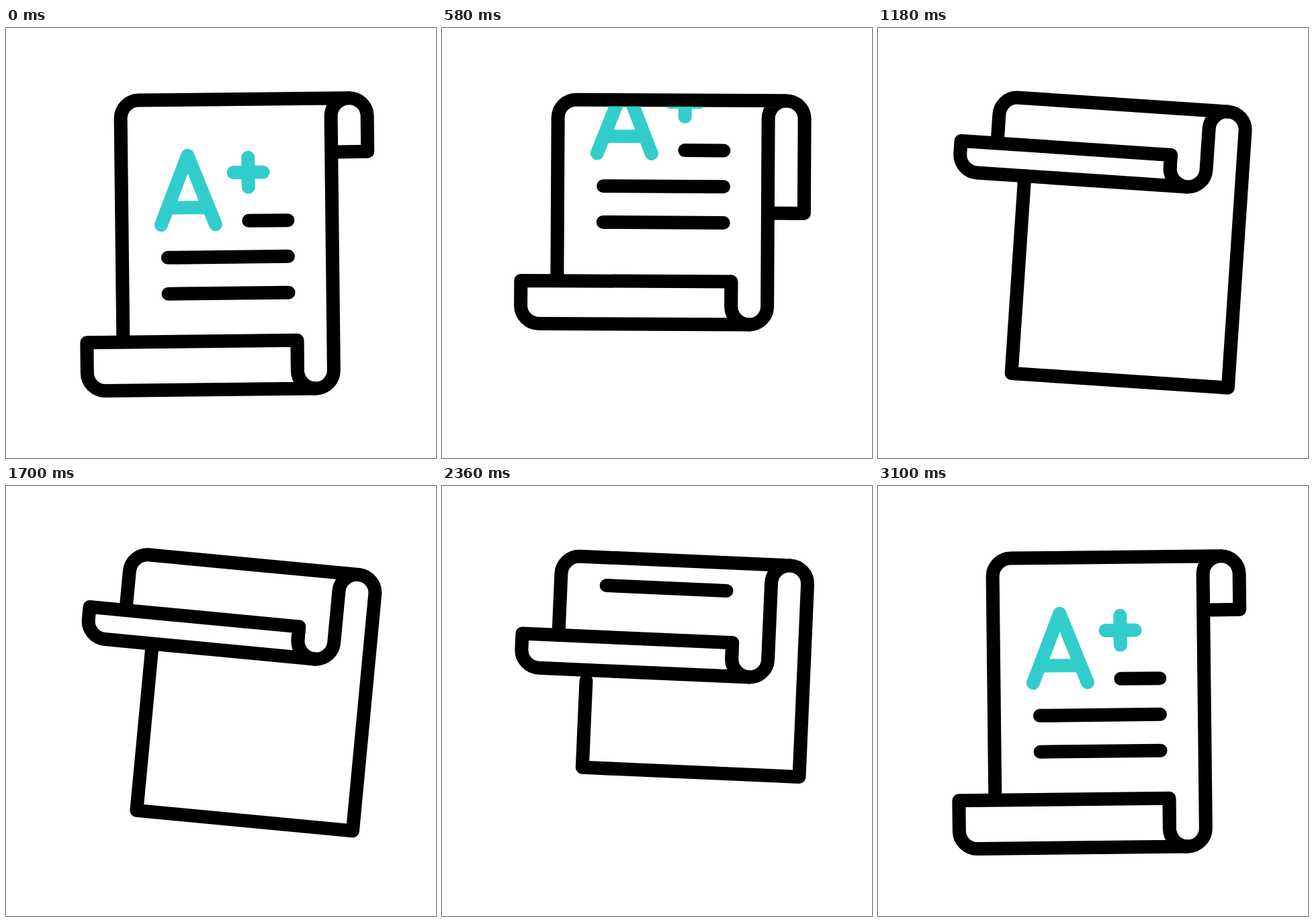
An HTML page for the animation above (3.6 s loop, 640 px wide and 640 px high).

```html
<!DOCTYPE html>
<html lang="en">
<head>
<meta charset="utf-8">
<title>Graded scroll</title>
<style>
  html, body { margin: 0; width: 100%; height: 100%; overflow: hidden; background: #fff; }
  svg { display: block; width: 100%; height: 100%; }
  path { stroke-width: 20; stroke-linecap: round; stroke-linejoin: round; }
</style>
</head>
<body>
<svg viewBox="0 0 640 640">
  <clipPath id="sheet"><rect x="172" y="116.5" width="313" height="420"/></clipPath>
  <g id="scroll" stroke="#000" fill="#fff">
    <path id="back" fill="none"/>
    <path id="page"/>
    <g clip-path="url(#sheet)">
      <g id="writing" fill="none">
        <path stroke="#33cccc" d="M230.5 293 L271 190 L311.5 293 M241 267.5 H301 M339 216 H383 M361 194 V238"/>
        <path d="M361 288 H419 M240 341.7 H419 M240 395.5 H419"/>
      </g>
    </g>
    <path id="roll"/>
  </g>
</svg>
<script>
const LOOP = 3600, START = 220, END = 3100, STEP = 20;
const el = id => document.getElementById(id);
const scroll = el('scroll'), back = el('back'), page = el('page'),
      writing = el('writing'), roll = el('roll');

// Keys are [ms since the motion began, value], eased in and out between them.
const tracks = {
  tilt: [[0, -0.64], [1440, 5.41], [2880, -0.64]],
  lift: [[0, 0], [970, 290], [1440, 274], [1880, 290], [2880, 0]],
  drop: [[40, 0], [990, 331], [1440, 300], [1780, 312], [2880, 0]],
  text: [[0, 0], [935, 322], [1802, 322], [2880, 0]],
  fold: [[0, 0], [970, 1], [1880, 1], [2880, 0]]
};

function valueAt(keys, t) {
  if (t <= keys[0][0]) return keys[0][1];
  for (let i = 1; i < keys.length; i++) {
    const [t0, a] = keys[i - 1], [t1, b] = keys[i];
    if (t <= t1) {
      const s = (t - t0) / (t1 - t0);
      return a + (b - a) * s * s * (3 - 2 * s);
    }
  }
  return keys[keys.length - 1][1];
}

function draw(ms) {
  const time = Math.floor((ms % LOOP) / STEP) * STEP;
  const t = Math.min(Math.max(time, START), END) - START;
  const at = name => valueAt(tracks[name], t);

  const fold = at('fold');
  const top = 466.8 - at('lift');
  const bottom = top + 72 - 26.2 * fold;
  const bend = bottom - 27;
  const flap = 187 + at('drop');
  const edge = Math.min(bottom + 94 * (1 - fold), flap);

  scroll.setAttribute('transform', `rotate(${at('tilt')} 254 256)`);
  writing.setAttribute('transform', `translate(0 ${-at('text')})`);
  back.setAttribute('d',
    `M216 ${edge} V${flap} H539 V134 A27 27 0 0 0 512 107`);
  page.setAttribute('d',
    `M172 ${top} V134 A27 27 0 0 1 199 107 H512 A27 27 0 0 0 485 134 ` +
    `V${bend} A27 27 0 0 1 431 ${bend} V${top}`);
  roll.setAttribute('d',
    `M118 ${top} H431 V${bend} A27 27 0 0 0 458 ${bottom} ` +
    `H145 A27 27 0 0 1 118 ${bend} Z`);
}

const origin = performance.now();
function frame() {
  draw(performance.now() - origin);
  requestAnimationFrame(frame);
}
frame();
</script>
</body>
</html>
```
